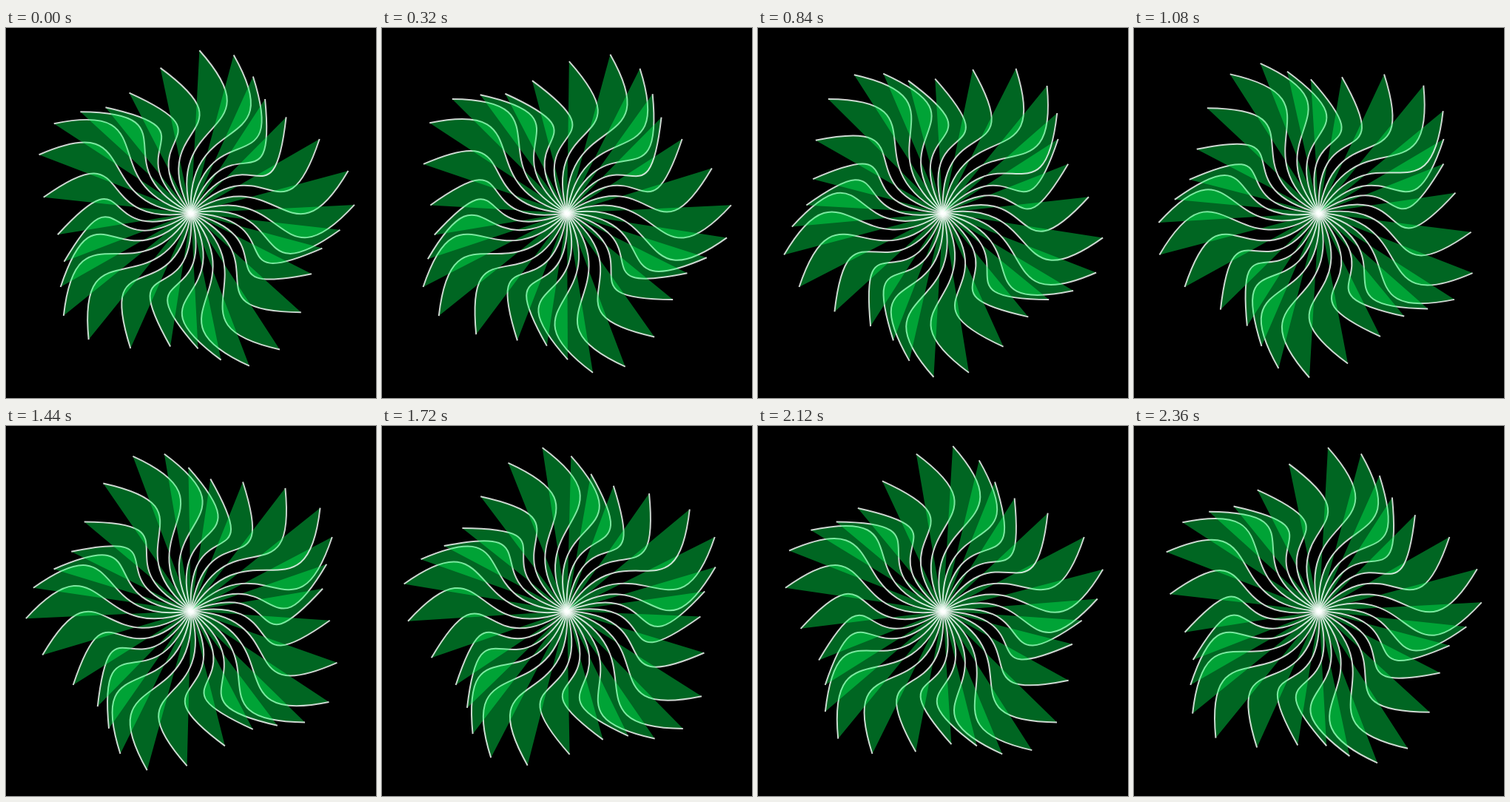
Animation of 500x500 px, one loop 2400 ms. Source, as an HTML page with a canvas:

```html
<!DOCTYPE html>
<html lang="en">
<head>
<meta charset="utf-8">
<title>Green pinwheel</title>
<style>
  html, body { margin: 0; height: 100%; overflow: hidden; background: #000; }
  canvas { display: block; }
</style>
</head>
<body>
<canvas id="stage" width="500" height="500"></canvas>
<script>
const ctx = document.getElementById('stage').getContext('2d');
const BLADES = 30, WAVES = 5, LOOP = 2400, STEP = 40, TAU = 2 * Math.PI;

ctx.fillStyle = 'rgba(0, 255, 85, 0.4)';
ctx.strokeStyle = 'rgba(255, 255, 255, 0.8)';
ctx.lineWidth = 2;

function drawBlade(angle, reach) {
  ctx.save();
  ctx.translate(250, 250);
  ctx.rotate(angle);
  ctx.beginPath();
  ctx.moveTo(0, 0);
  ctx.bezierCurveTo(100, -100, reach - 50, 50, reach, -100);
  ctx.fill();
  ctx.stroke();
  ctx.restore();
}

function draw(now) {
  // The motion runs in 40 ms steps, each showing the pose at its middle.
  const time = (Math.floor(now / STEP) + 0.5) * STEP % LOOP;
  ctx.clearRect(0, 0, 500, 500);
  for (let i = 0; i < BLADES; i++) {
    const angle = TAU * i / BLADES;
    drawBlade(angle, 175 + 25 * Math.sin(WAVES * angle - TAU * time / LOOP));
  }
}

function tick() {
  draw(performance.now());
  requestAnimationFrame(tick);
}
tick();
</script>
</body>
</html>
```
